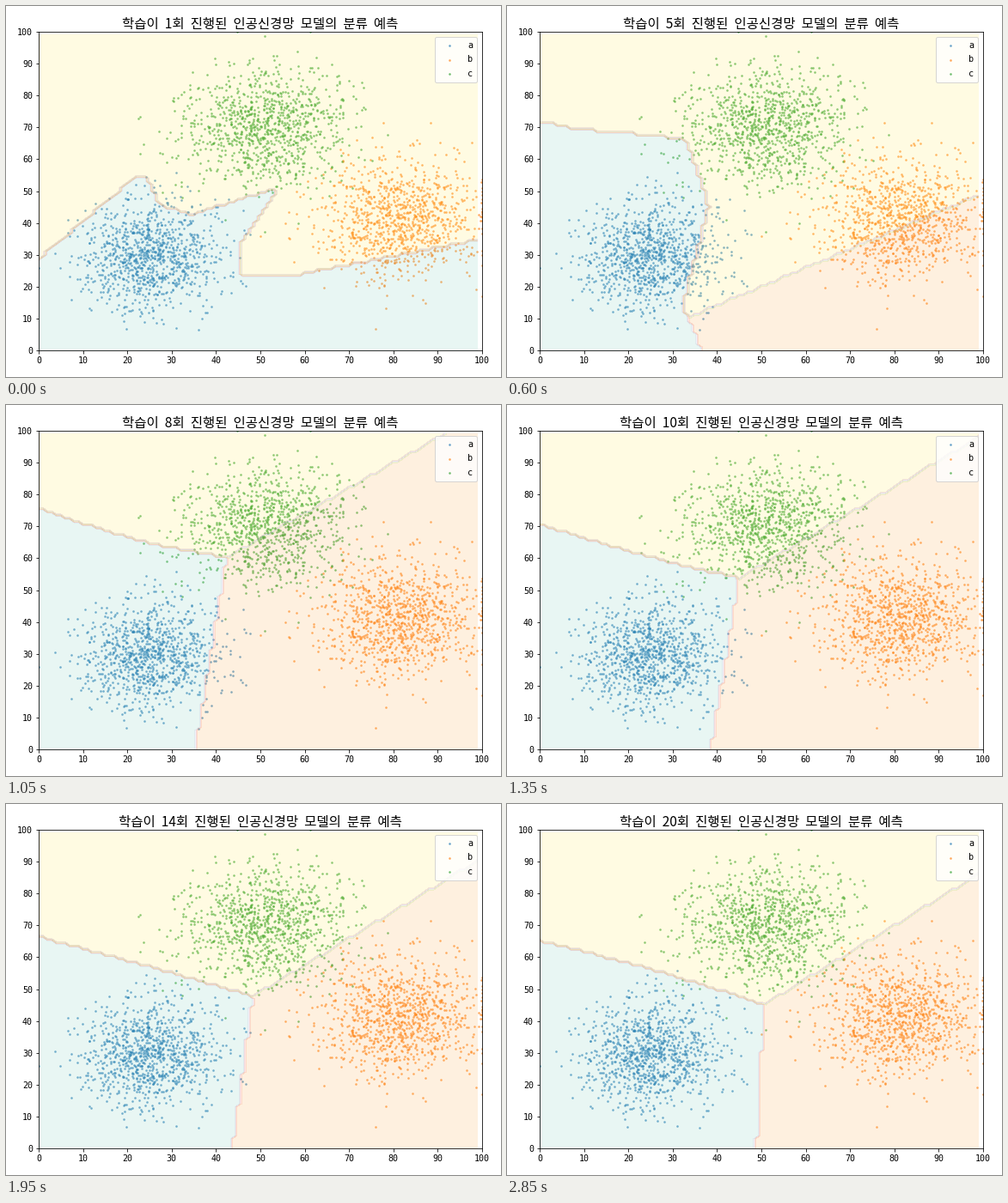
A matplotlib script that plays this animation: 576x432 px, repeating every 3000 ms.

```python
import numpy as np
import matplotlib.pyplot as plt
from matplotlib.animation import FuncAnimation

EPOCHS = 20
plt.rcParams["font.family"] = "DejaVu Sans Mono"
plt.rcParams["font.size"] = 10

# Class name: centre and spread of its cluster.
CLUSTERS = {
    "a": ((25, 30.5), (8, 8.5)),
    "b": ((81, 41.5), (9, 9.5)),
    "c": ((51.5, 70), (9.3, 9.3)),
}

axis = np.arange(100)
gx, gy = np.meshgrid(axis, axis)


def polyline(*points):
    return np.interp(axis, *zip(*points))


# Each state holds four borders sampled on the grid axis:
#   top   y over x, upper edge of class a
#   side  x over y, right edge of class a
#   ceil  y over x, upper edge of class b
#   floor y over x, low strip that first belongs to class a
FIRST = np.array([
    polyline((0, 28.7), (21.9, 54.6), (24.2, 54.6), (27.5, 45.5),
             (34.3, 42.6), (52, 50.2)),
    polyline((33, 45.5), (50, 53.7)),
    polyline((0, -80), (99, -60)),
    polyline((58, 23.7), (99, 34.7)),
])
THIRD = np.array([
    polyline((8, 63.6), (21, 66.4)),
    polyline((0, 39.7), (14.3, 29.6), (45, 37.8), (57.4, 31), (66.5, 24.8)),
    polyline((30, -40), (99, -12)),
    polyline((0, -30), (99, -30)),
])


def settle(epoch, start, end, pace):
    """Exponential approach that begins at epoch 7."""
    return end + (start - end) * np.exp((7 - epoch) / pace)


def settled(epoch):
    """Three nearly straight borders that meet in one moving joint."""
    jx = settle(epoch, 40.7, 52, 6.3)
    jy = settle(epoch, 65, 44.5, 3.8)
    left = settle(epoch, 80.2, 64.8, 3.1)
    foot = settle(epoch, 33.4, 57, 12.2)
    right = settle(epoch, 109.8, 84.5, 4.8)
    bulge = settle(epoch, -2.5, 1.5, 6)
    u = np.clip(axis / jx, 0, 1)
    return np.array([
        left + (jy - left) * u + bulge * np.sin(np.pi * u),
        foot + (jx - foot) * np.clip(axis / jy, 0, 1),
        jy + (right - jy) * (axis - jx) / (99 - jx),
        THIRD[3],
    ])


def borders(epoch):
    if epoch >= 7:
        return settled(epoch)
    if epoch >= 3:
        return THIRD + (settled(7) - THIRD) * (epoch - 3) / 4
    return FIRST + (THIRD - FIRST) * (epoch - 1) / 2


def classify(epoch):
    top, side, ceil, floor = borders(epoch)
    in_a = (gy < top[gx]) & (gx < side[gy]) | (gy < floor[gx])
    return np.where(in_a, 0, np.where(gy < ceil[gx], 1, 2))


fig = plt.figure(figsize=(8, 6), dpi=72)
ax = fig.add_axes([38 / 576, 31 / 432, 516 / 576, 371 / 432])

rng = np.random.default_rng(7)
for name, (center, spread) in CLUSTERS.items():
    points = np.clip(rng.normal(center, spread, (1000, 2)), 0, 100)
    ax.scatter(*points.T, s=3, alpha=0.5, label=name)

# The translucent class areas lie over the points and tint them.
fills = [ax.contourf(gx, gy, classify(e), levels=np.linspace(0, 2, 9),
                     cmap="Set3", alpha=0.2, zorder=1.2)
         for e in range(1, EPOCHS + 1)]

ax.set(xlim=(0, 100), ylim=(0, 100),
       xticks=range(0, 101, 10), yticks=range(0, 101, 10))
ax.legend(loc="upper right", borderaxespad=0.6, borderpad=0.48,
          handlelength=2.35, handletextpad=0.96, labelspacing=0.66)
title = ax.set_title("", fontname="Noto Sans CJK JP", fontsize=15.5, pad=4.5)


def update(i):
    for k, fill in enumerate(fills):
        fill.set_visible(k == i)
    words = f"학습이 {i + 1}회 진행된 인공신경망 모델의 분류 예측"
    title.set_text(words.replace(" ", "  "))
    return [title, *fills]


anim = FuncAnimation(fig, update, frames=EPOCHS, interval=150,
                     repeat=True, repeat_delay=0, blit=False)
plt.show()
```
